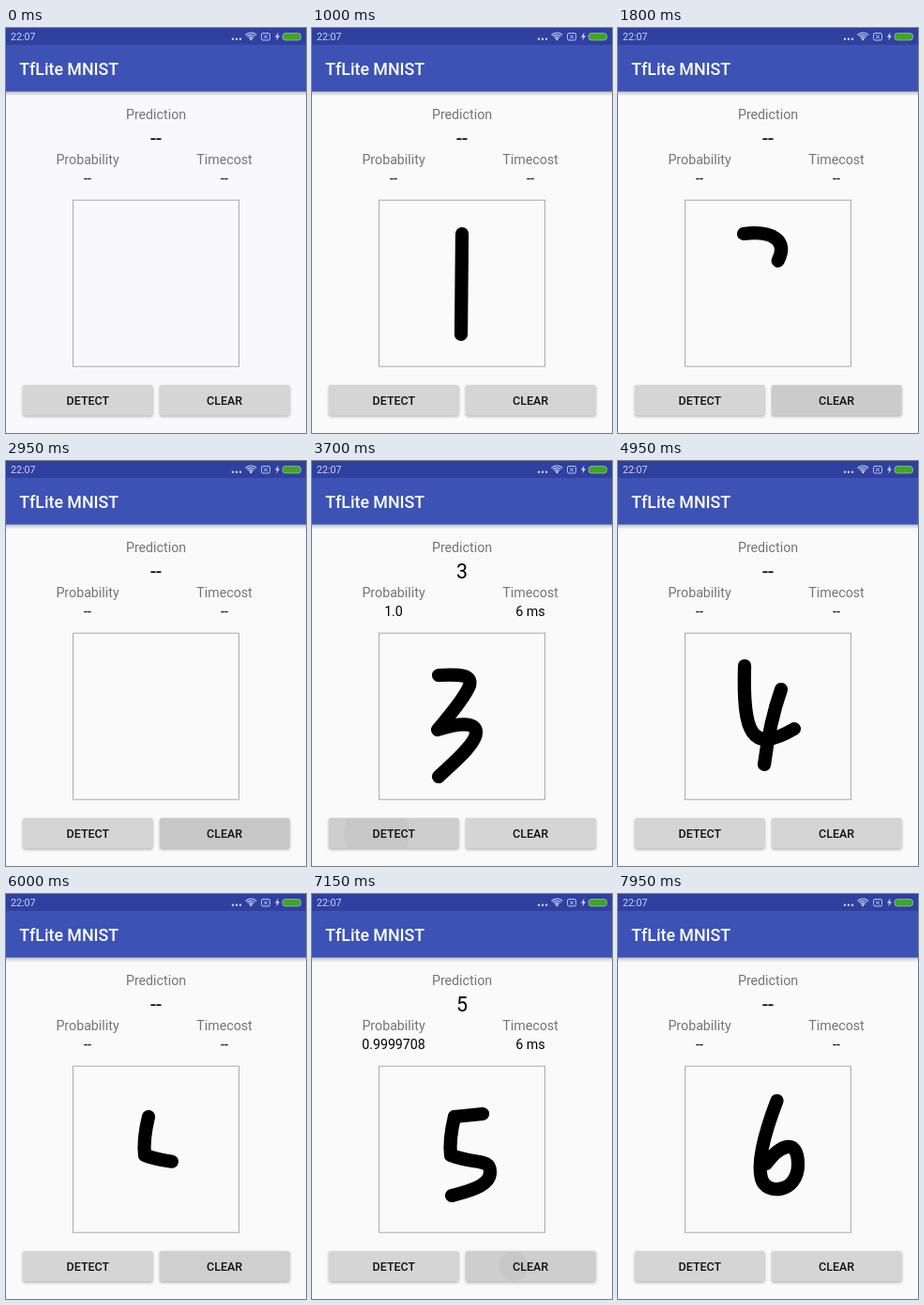
Write an HTML page with a canvas that moves like this. It is 320 px wide and 431 px high and loops after 8000 ms.

```html
<!DOCTYPE html>
<html lang="en">
<head>
<meta charset="utf-8">
<title>TfLite MNIST</title>
<style>
  html, body { margin: 0; width: 100%; height: 100%; overflow: hidden; background: #fafafa; }
  canvas, svg { position: absolute; left: 0; top: 0; width: 320px; height: 431px; }
  text { font-family: Roboto, "Open Sans", sans-serif; font-size: 14.22px; text-anchor: middle; }
  .label { fill: #757575; }
  .title { font-size: 17.8px; font-weight: 500; fill: #fff; text-anchor: start; }
  .clock { font-size: 10.67px; fill: #ccd2ee; text-anchor: start; }
  .big { font-size: 21.33px; }
  .button { font-size: 12.44px; font-weight: 500; fill: #111; }
</style>
</head>
<body>
<canvas id="stage" width="320" height="431"></canvas>
<svg viewBox="0 0 320 431">
  <text class="clock" x="5" y="13">22:07</text>
  <text class="title" x="14.2" y="49.8">TfLite MNIST</text>
  <text class="label" x="160" y="97">Prediction</text>
  <text class="label" x="87" y="145">Probability</text>
  <text class="label" x="233" y="145">Timecost</text>
  <text class="big" id="digit" x="160" y="124.8"></text>
  <text id="prob" x="87" y="164.6"></text>
  <text id="cost" x="233" y="164.6"></text>
  <text class="button" x="87.3" y="400.6">DETECT</text>
  <text class="button" x="233" y="400.6">CLEAR</text>
</svg>
<script>
const LOOP = 8000, STEP = 50, PRESS = 120, FADE = 300;
const ctx = document.getElementById('stage').getContext('2d');
const fields = ['digit', 'prob', 'cost'].map(id => document.getElementById(id));

// Round n writes the digit n + 1; detect and clear are the ends of the presses.
const rounds = [
  { strokes: [pen(400, 850, 'M160 219L159 326')],
    detect: 1200, clear: 1450, prob: '1.0' },
  { strokes: [pen(1700, 2050, 'M134 219C165 215 185 227 168 252Q154 285 134 318H208')],
    detect: 2400, clear: 2700, prob: '0.99999464' },
  { strokes: [pen(2950, 3400,
      'M135 228C158 227 171 227 168 239Q163 252 134 286C156 279 175 277 175 289S152 320 135 336')],
    detect: 3700, clear: 4100, prob: '1.0' },
  { strokes: [pen(4350, 4650, 'M135 218C133 290 142 312 188 285'),
      pen(4800, 4950, 'M174 243Q162 277 156 323')],
    detect: 5250, clear: 5600, prob: '0.9998' },
  { strokes: [pen(5850, 6150, 'M152 237Q146 262 148 278C175 288 190 281 190 296S165 317 149 321'),
      pen(6350, 6450, 'M152 237L182 234')],
    detect: 6850, clear: 7250, prob: '0.9999708' },
  { strokes: [pen(7550, 7950,
      'M169.5 220C158 250 148 285 153 303S192 318 192 288S172 268 158 287')],
    detect: Infinity, clear: Infinity }
];

function pen(from, to, d) {
  const el = document.createElementNS('http://www.w3.org/2000/svg', 'path');
  el.setAttribute('d', d);
  return { from, to, path: new Path2D(d), len: el.getTotalLength() };
}

function box(x, y, w, h, r) {
  ctx.beginPath();
  ctx.roundRect(x, y, w, h, r);
}

function disc(x, y, r) {
  ctx.beginPath();
  ctx.arc(x, y, r, 0, 7);
  ctx.fill();
}

function statusBar() {
  ctx.fillStyle = ctx.strokeStyle = '#ccd2ee';
  ctx.lineWidth = 1.2;
  for (let x = 242; x <= 250; x += 4) disc(x, 11.7, 1.2);
  for (let r = 3.2; r < 9; r += 2.4) {
    ctx.beginPath();
    ctx.arc(261.3, 13, r, -Math.PI * 0.76, -Math.PI * 0.24);
    ctx.stroke();
  }
  disc(261.3, 12, 1.2);
  ctx.lineWidth = 0.9;
  box(272.5, 5.5, 9, 7.5, 1.5);
  ctx.stroke();
  ctx.stroke(new Path2D('M275 7.3l4 4m0 -4l-4 4'));
  ctx.fill(new Path2D('M290.5 4.5L287 9.7h2.2l-.9 3.8L292 8.2h-2.2z'));
  box(295, 5.5, 19.5, 7.5, 3);
  ctx.fillStyle = '#3fa61f';
  ctx.fill();
  ctx.strokeStyle = 'rgba(204,210,238,.6)';
  ctx.stroke();
}

function header() {
  const bottom = 67.7;
  const shade = ctx.createLinearGradient(0, bottom, 0, bottom + 5);
  shade.addColorStop(0, 'rgba(0,0,0,.22)');
  shade.addColorStop(1, 'rgba(0,0,0,0)');
  ctx.fillStyle = shade;
  ctx.fillRect(0, bottom, 320, 5);
  ctx.fillStyle = '#3c52b5';
  ctx.fillRect(0, 0, 320, bottom);
  ctx.fillStyle = '#2f409f';
  ctx.fillRect(0, 0, 320, 18);
  statusBar();
}

// A press ending at `end` lifts the button and spreads a ripple, which fades after `hold`.
function button(x, end, reach, hold, fade, t) {
  const grow = (t - end + PRESS) / PRESS;
  const lift = grow > 0 && grow < 1 ? grow : 0;
  const left = grow > 0 ? Math.min(1, Math.max(0, 1 - (t - hold) / fade)) : 0;

  ctx.save();
  ctx.shadowColor = 'rgba(0,0,0,.32)';
  ctx.shadowBlur = 3 + 3 * lift;
  ctx.shadowOffsetY = 1 + 1.5 * lift;
  ctx.fillStyle = '#d5d5d5';
  box(x, 380, 138.5, 32.5, 2);
  ctx.fill();
  ctx.restore();
  if (!left) return;

  ctx.save();
  ctx.clip();
  ctx.fillStyle = `rgba(0,0,0,${0.035 * left})`;
  ctx.fillRect(x, 380, 139, 33);
  disc(x + 51, 396, reach * Math.min(1, grow));
  ctx.restore();
}

function drawStroke(s, t) {
  const done = Math.min(1, (t - s.from) / (s.to - s.from));
  if (done <= 0) return;
  ctx.setLineDash(done < 1 ? [s.len * done, 1000] : []);
  ctx.stroke(s.path);
  ctx.setLineDash([]);
}

function show(...values) {
  fields.forEach((el, i) => {
    if (el.textContent !== values[i]) el.textContent = values[i];
  });
}

function render(ms) {
  const t = Math.floor(ms / STEP) * STEP;
  const n = rounds.findIndex(r => t < r.clear);
  const now = rounds[n], last = rounds[n - 1];
  const clearAt = now.clear - PRESS;

  ctx.fillStyle = t < 450 ? '#f9f9fb' : '#fafafa';
  ctx.fillRect(0, 0, 320, 431);
  header();

  ctx.strokeStyle = '#aaa';
  ctx.lineWidth = 1;
  ctx.strokeRect(71.5, 183.2, 177, 177);

  button(18, now.detect, 35, clearAt, 1, t);
  if (t >= clearAt || !last) button(164, now.clear, 95, LOOP, FADE, t);
  else button(164, last.clear, 95, now.strokes[0].from, FADE, t);

  ctx.save();
  ctx.beginPath();
  ctx.rect(72, 184, 176, 176);
  ctx.clip();
  ctx.strokeStyle = '#000';
  ctx.lineWidth = 14.2;
  ctx.lineCap = ctx.lineJoin = 'round';
  now.strokes.forEach(s => drawStroke(s, t));
  ctx.restore();

  if (t >= now.detect) show(String(n + 1), now.prob, '6 ms');
  else show('--', '--', '--');
}

const start = performance.now();
function tick() {
  render((performance.now() - start) % LOOP);
  requestAnimationFrame(tick);
}
tick();
</script>
</body>
</html>
```
